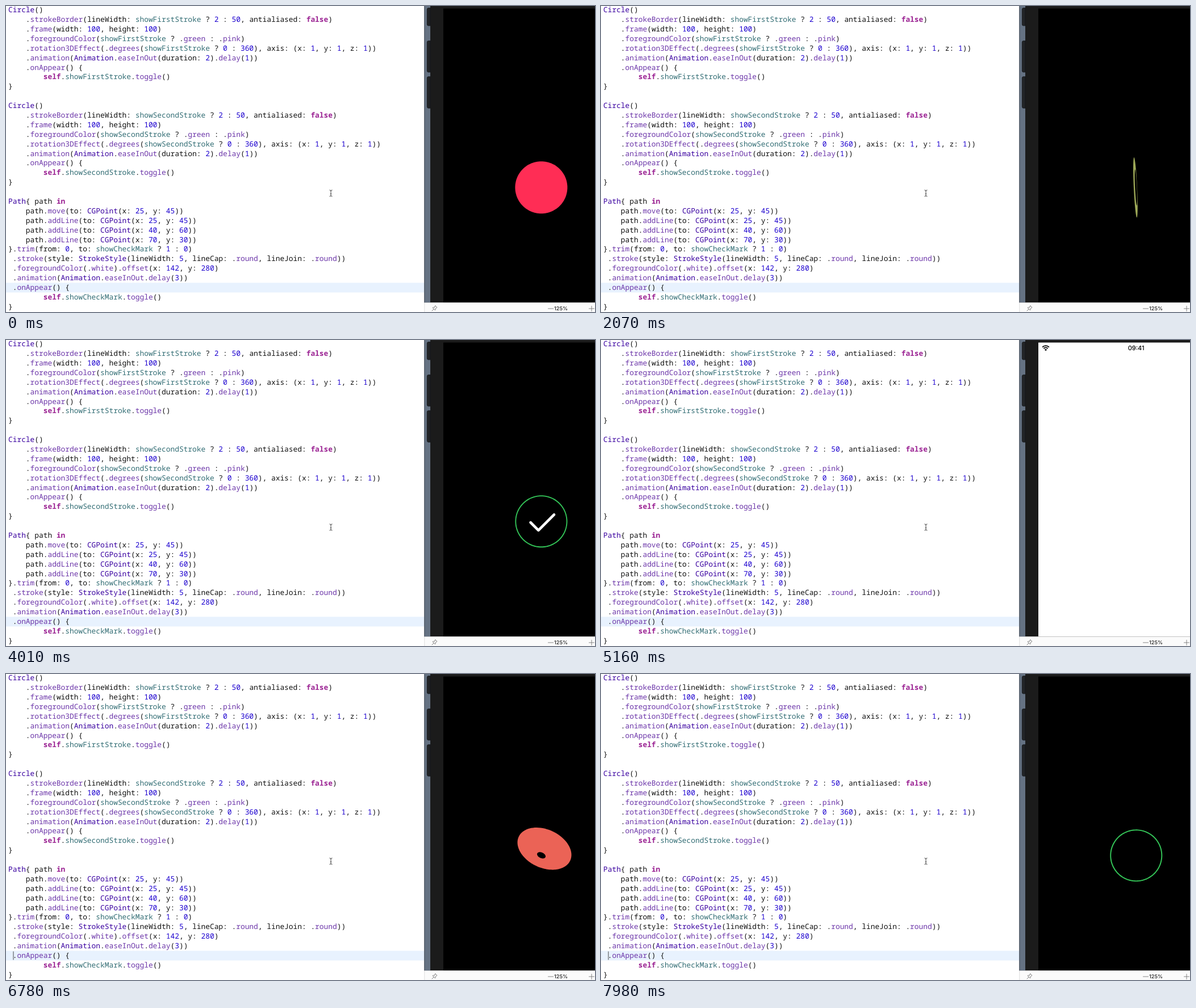
An HTML page that plays this animation: 1037x540 px, repeating every 8 s.

```html
<!DOCTYPE html>
<html lang="en">
<head>
<meta charset="utf-8">
<title>Circle animation preview</title>
<style>
html, body { margin: 0; width: 100%; height: 100%; overflow: hidden; background: #fff; }
svg { display: block; width: 100%; height: 100%; }
#code { font: 12.86px "Noto Sans Mono", "DejaVu Sans Mono", monospace; white-space: pre; text-rendering: geometricPrecision; fill: #111; }
.kw { fill: #9b2393; font-weight: 700; }
.type { fill: #3900a0; }
.prop { fill: #326d74; }
.fn { fill: #6c36a9; }
.num { fill: #1c00cf; }
.ui { font-family: Inter, "Liberation Sans", sans-serif; text-rendering: geometricPrecision; }
</style>
</head>
<body>
<svg viewBox="0 0 1037 540" xmlns="http://www.w3.org/2000/svg">
  <rect width="1037" height="540" fill="#fff"/>
  <rect y="488.5" width="736.5" height="17" fill="#e8f2fe"/>
  <g id="code"></g>
  <path id="caret" d="M13 489.5V504.5" stroke="#444" stroke-width="1"/>
  <g id="beam" fill="none" stroke="#4a4a4a" stroke-width="1">
    <path d="M569.5 324.8Q572 324.8 572 326.5Q572 324.8 574.5 324.8M572 326V335M569.5 336Q572 336 572 334.5Q572 336 574.5 336M570.8 331.5H573.2"/>
  </g>

  <rect x="736.5" width="300.5" height="523.5" fill="#1b1b1b"/>
  <rect x="736.5" width="10.5" height="523.5" fill="#657283"/>
  <path d="M737 0V523.5" stroke="#505a66"/>
  <g fill="#222426" stroke="#14161a" stroke-width=".8">
    <path d="M747 3.5H743.5Q741.4 3.5 741.4 6V32Q741.4 34.8 743.5 34.8H747Z"/>
    <path d="M747 61.5H743.5Q741.4 61.5 741.4 64V114Q741.4 116.8 743.5 116.8H747Z"/>
    <path d="M747 124.7H743.5Q741.4 124.7 741.4 127V177.500Q741.4 180.2 743.5 180.2H747Z"/>
  </g>
  <rect id="screen" x="770" y="4.5" width="267" height="518.5"/>
  <path id="ring" fill-rule="evenodd"/>
  <path id="check" d="M923.6 322L937.4 335.8L965 308.2" pathLength="1" stroke-dasharray="1 2"
    fill="none" stroke="#fff" stroke-width="4.6" stroke-linecap="round" stroke-linejoin="round"/>
  <g id="status">
    <g fill="none" stroke="#000" stroke-width="1.9">
      <path d="M777.1 12.600A8.3 8.3 0 0 1 788.9 12.600"/>
      <path d="M779.4 15A5.1 5.1 0 0 1 786.6 15"/>
    </g>
    <path d="M783 19.200L780.9 17A3 3 0 0 1 785.1 17Z"/>
    <text class="ui" x="942.2" y="17.800" font-size="11" font-weight="500" text-anchor="middle">09:41</text>
  </g>

  <rect x="736.5" y="523.5" width="300.500" height="16.5" fill="#fbfbfb"/>
  <path d="M736.8 524V540" stroke="#d8d8d8" stroke-width=".8"/>
  <g fill="none" stroke="#777" stroke-width=".9" stroke-linejoin="round" stroke-linecap="round">
    <path transform="translate(754 534) rotate(45)" d="M-2 -5H2L1.500 -1.500Q3.200 -.6 3.200 1H-3.200Q-3.200 -.6 -1.500 -1.500ZM0 1V5.500"/>
    <path d="M954.5 534H963.5M1026.500 534H1035.500M1031 529.500V538.500"/>
  </g>
  <text class="ui" x="965" y="537.400" font-size="9.200" font-weight="500" fill="#222">125%</text>
</svg>
<script>
const $ = id => document.getElementById(id);
const NS = 'http://www.w3.org/2000/svg';

const circleCode = name => `Circle()
    .strokeBorder(lineWidth: ${name} ? 2 : 50, antialiased: false)
    .frame(width: 100, height: 100)
    .foregroundColor(${name} ? .green : .pink)
    .rotation3DEffect(.degrees(${name} ? 0 : 360), axis: (x: 1, y: 1, z: 1))
    .animation(Animation.easeInOut(duration: 2).delay(1))
    .onAppear() {
        self.${name}.toggle()
}

`;
const code = circleCode('showFirstStroke') + circleCode('showSecondStroke') + `Path{ path in
    path.move(to: CGPoint(x: 25, y: 45))
    path.addLine(to: CGPoint(x: 25, y: 45))
    path.addLine(to: CGPoint(x: 40, y: 60))
    path.addLine(to: CGPoint(x: 70, y: 30))
}.trim(from: 0, to: showCheckMark ? 1 : 0)
 .stroke(style: StrokeStyle(lineWidth: 5, lineCap: .round, lineJoin: .round))
 .foregroundColor(.white).offset(x: 142, y: 280)
 .animation(Animation.easeInOut.delay(3))
 .onAppear() {
        self.showCheckMark.toggle()
}`;

function tokenClass(word, before) {
  if (/^(self|false|in)$/.test(word)) return 'kw';
  if (/^show/.test(word)) return 'prop';
  if (/^\d/.test(word)) return 'num';
  if (/^[A-Z]/.test(word)) return 'type';
  return before === '.' ? 'fn' : '';
}

const ADVANCE = 7.716, PITCH = 16.89;
code.split('\n').forEach((line, row) => {
  const text = document.createElementNS(NS, 'text');
  text.setAttribute('y', 11.2 + row * PITCH);
  for (const m of line.matchAll(/\w+|[^\w\s]+/g)) {
    const span = document.createElementNS(NS, 'tspan');
    span.setAttribute('x', 4 + m.index * ADVANCE);
    span.setAttribute('class', tokenClass(m[0], line[m.index - 1]));
    span.textContent = m[0];
    text.append(span);
  }
  $('code').append(text);
});

// Timeline in ms
const LOOP = 8000, SPIN = 1770, DRAW = 310;
const WHITE = 5160, RESTART = 5290;
const SPIN_STARTS = [996, 6262], CHECK_START = 2766;
const CARET = [330, 890, 1400, 1890, 2390, 2890, 3450, 4010, 4540, 5100, 5650, 6210, 6740, 7270, 7780];
const BEAM_GONE = [4570, 4770];

const clamp = v => Math.min(1, Math.max(0, v));

// cubic-bezier(.42, 0, .58, 1)
function easeInOut(x) {
  let lo = 0, hi = 1;
  for (let i = 0; i < 24; i++) {
    const u = (lo + hi) / 2, v = 1 - u;
    if (1.26 * v * v * u + 1.74 * v * u * u + u * u * u < x) lo = u; else hi = u;
  }
  return lo * lo * (3 - 2 * lo);
}

const toLinear = c => (c /= 255) <= .04045 ? c / 12.92 : ((c + .055) / 1.055) ** 2.4;
const toSrgb = c => Math.round(255 * (c <= .0031308 ? c * 12.92 : 1.055 * c ** (1 / 2.4) - .055));
const PINK = [255, 45, 85], GREEN = [52, 199, 89];
const mix = p => `rgb(${PINK.map((c, i) => toSrgb(toLinear(c) * (1 - p) + toLinear(GREEN[i]) * p))})`;

// Circle turned about the (1,1,1) axis, seen in perspective
const CX = 942.4, CY = 320.2, SIZE = 92;
function circlePath(r, angle) {
  const c = Math.cos(angle), s = Math.sin(angle) / Math.sqrt(3), k = (1 - c) / 3;
  const a = c + k, b = k - s, e = k + s, n = 120;
  let d = '';
  for (let i = 0; i < n; i++) {
    const w = 2 * Math.PI * i / n, x = r * Math.cos(w), y = r * Math.sin(w);
    const scale = 1 / (1 - (b * x + e * y) / SIZE);
    d += (i ? 'L' : 'M') + (CX + (a * x + b * y) * scale).toFixed(2) + ' ' + (CY + (e * x + a * y) * scale).toFixed(2);
  }
  return d + 'Z';
}

const show = (id, on) => $(id).setAttribute('visibility', on ? 'visible' : 'hidden');

function draw(t) {
  const loading = t >= WHITE && t < RESTART;
  const start = SPIN_STARTS[t < RESTART ? 0 : 1];
  const p = easeInOut(clamp((t - start) / SPIN));
  const angle = 2 * Math.PI * (1 - p), outer = SIZE / 2;
  const inner = outer - (50 - 48 * p) * SIZE / 100;
  $('ring').setAttribute('d', circlePath(outer, angle) + (inner > .05 ? circlePath(inner, angle) : ''));
  $('ring').setAttribute('fill', mix(p));

  const drawn = t < WHITE ? easeInOut(clamp((t - CHECK_START) / DRAW)) : 0;
  $('check').setAttribute('stroke-dasharray', drawn + ' 2');

  $('screen').setAttribute('fill', loading ? '#fff' : '#000');
  show('status', loading);
  show('ring', !loading);
  show('check', drawn > .001);
  show('caret', CARET.filter(c => c <= t).length % 2);
  show('beam', t < BEAM_GONE[0] || t >= BEAM_GONE[1]);
}

function tick() {
  draw(performance.now() % LOOP);
  requestAnimationFrame(tick);
}
tick();
</script>
</body>
</html>
```
